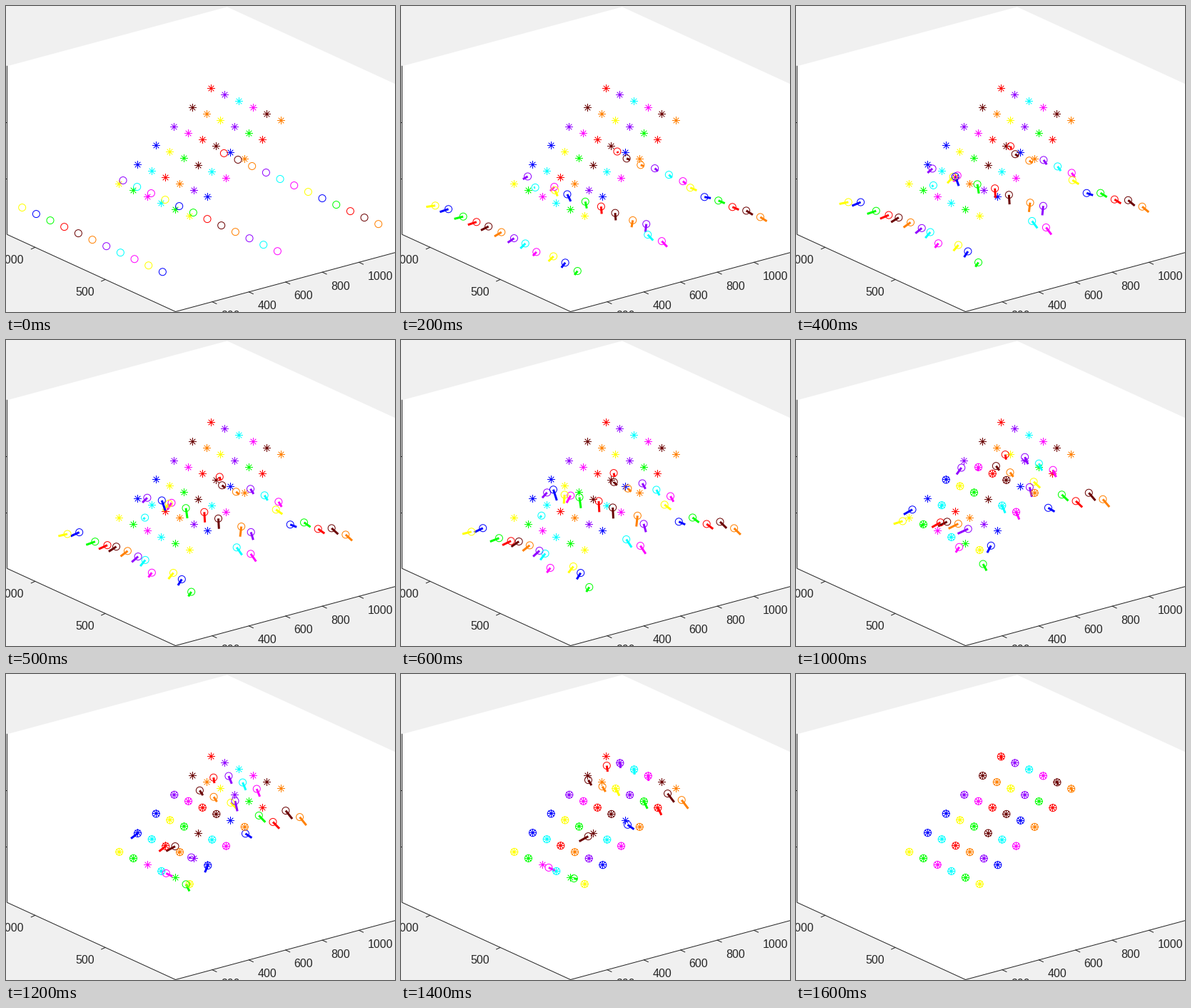
Animation of 545x429 px, one loop 1700 ms. Source, as a matplotlib script:

```python
import numpy as np
import matplotlib.pyplot as plt
from matplotlib.animation import FuncAnimation
from matplotlib.collections import LineCollection

W, H, DPI = 545, 429, 100
PX = 72 / DPI
FRAMES, STEP = 17, 100
INK = "#262626"
CYCLE = ["#ffff00", "#0000ff", "#00ff00", "#ff0000", "#6a0000",
         "#ff8000", "#9000ff", "#00ffff", "#ff00ff"]

# world units to pixels: one row per axis
VIEW = np.array([[0.257, -0.0692], [-0.1967, -0.0902], [0, -0.315]])
ORIGIN = np.array([237, 428])
SIDE, TOP = 1200, 749

SPEED = 40   # world units per step
CLIMB = 1.35  # above 1: height is gained late
LEAD = 1.03   # ground travel ends a little before the climb
LATE = 11     # this drone only shows up after the first step

# row and column of each drone's place in the formation, one string per start line
GOALS = ("50 40 51 42 33 43 44 53 52 55 45 54 "
         "00 10 11 01 02 03 12 24 14 15 04 05 "
         "20 41 21 31 30 32 22 23 25 13 34 35").split()

# sidesteps around neighbours: drone -> (peak step, dx, dy, end step)
SIDESTEPS = {4: (8, -8, -8, 16), 5: (8, -10, -6, 12), 6: (8, -18, -8, 13),
             8: (11, 35, 16, 15), 11: (8, 34, 8, 15),
             27: (3, -14, -3, 5), 33: (4, 12, -8, 12)}


def project(x, y, z=0):
    return ORIGIN + np.stack([x, y, z * np.ones_like(x)], axis=-1) @ VIEW


def start(i):
    line = (0, 2, 1)[i // 12]
    return np.array([6 + 550 * line, 1100 - 100 * (i % 12), 147])


def goal(code):
    row, col = map(int, code)
    x = 800 - 100 * row
    return np.array([x + 6, 800 - 100 * col, 84 + 0.628 * x])


def flight(i):
    a, b = start(i), goal(GOALS[i])
    t = np.arange(FRAMES)
    p = np.clip(SPEED * t / np.linalg.norm(b - a), 0, 1)
    ground = np.minimum(1, LEAD * p)
    x, y, z = (a + (b - a) * np.stack([ground, ground, p ** CLIMB], axis=1)).T
    path = project(x, y, z)
    if i in SIDESTEPS:
        peak, dx, dy, end = SIDESTEPS[i]
        path += np.outer(np.interp(t, [0, peak, end], [0, 1, 0]), [dx, dy])
    return path


paths = np.array([flight(i) for i in range(len(GOALS))])
places = np.array([project(*goal(code)) for code in GOALS])
colors = [CYCLE[i % len(CYCLE)] for i in range(len(GOALS))]

fig = plt.figure(figsize=(W / DPI, H / DPI), dpi=DPI, facecolor="#f0f0f0")
ax = fig.add_axes([0, 0, 1, 1])
ax.set_xlim(-0.5, W - 0.5)
ax.set_ylim(H - 0.5, -0.5)
ax.axis("off")


def stroke(*points):
    ax.plot(*zip(*points), color=INK, lw=PX, zorder=1)


def tick(point, dx, dy):
    stroke(point, point + (dx, dy))


def label(point, dx, dy, value, ha):
    x, y = point + (dx, dy)
    ax.text(x, y, str(value), color=INK, family="Liberation Sans", size=16 * PX,
            ha=ha, va="center_baseline", zorder=1)


# plot box
left, front, right = project(0, SIDE), project(0, 0), project(SIDE, 0)
outline = [left, front, right, project(SIDE, 0, TOP),
           project(SIDE, SIDE, TOP), project(0, SIDE, TOP)]
ax.fill(*zip(*outline), color="white", lw=0, zorder=0)
stroke(outline[-1], left, front, right)
for z in (250, 500):
    tick(project(0, SIDE, z), -5, 0)
for y in (500, 1000):
    at = project(0, y)
    tick(at, -5.5, 2.5)
    label(at, -15.5, 16.5, y, "right")
for x in range(200, 1001, 200):
    at = project(x, 0)
    tick(at, 6, 2.8)
    label(at, 12, 18.5, x, "left")

size = (10 * PX) ** 2
ax.scatter(*np.round(places).T, s=size, marker=(8, 2, 0), c=colors,
           linewidths=0.7 * PX, zorder=2)
tails = LineCollection([], colors=colors, linewidths=3 * PX, capstyle="butt", zorder=3)
ax.add_collection(tails, autolim=False)
rings = ax.scatter(*paths[:, 0].T, s=size, marker="o", facecolors="none",
                   edgecolors=colors, linewidths=PX, zorder=4)


def draw(i):
    now = paths[:, i].copy()
    tails.set_segments(np.stack([paths[:, max(i - 1, 0)], now], axis=1))
    if i == 0:
        now[LATE] = -99, -99
    rings.set_offsets(now)
    return tails, rings


anim = FuncAnimation(fig, draw, frames=FRAMES, interval=STEP, repeat=True, repeat_delay=0)
plt.show()
```
